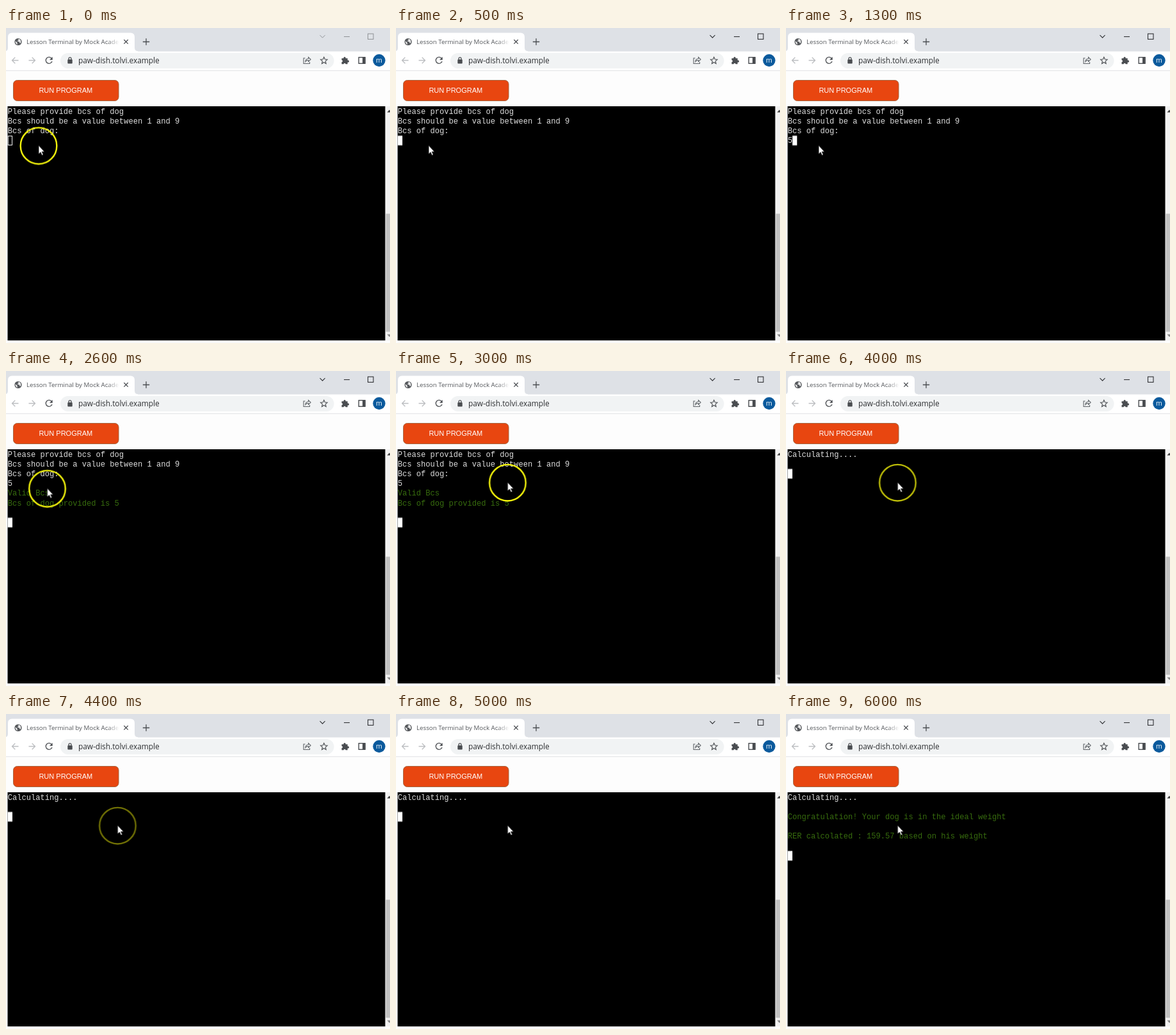
Recreate the animation shown at these times as an HTML page. Size 600 px wide and 491 px high, loop 7000 ms.

```html
<!DOCTYPE html>
<html lang="en">
<head>
<meta charset="utf-8">
<title>Terminal session</title>
<style>
  html, body { margin: 0; width: 100%; height: 100%; overflow: hidden; background: #fdfdfd; }
  svg { display: block; width: 100%; height: 100%; }

  .ui { font-family: "Open Sans", "Noto Sans", sans-serif; }
  .line { fill: none; stroke: #4a4d51; stroke-width: 1.3; }
  .term { font: 12.1px "Liberation Mono", "Courier New", monospace; fill: #dedede; }
  .ok { fill: #376c0e; }

  /* 7 s loop: 100 ms is 1.4286 % */
  .anim { animation: 7s step-end infinite; }
  .blurred { animation-name: blurred; }
  .focused { animation-name: focused; }
  .ask { animation-name: ask; }
  .typed { animation-name: typed; }
  .valid { animation-name: valid; }
  .calc { animation-name: calc; }
  .result { animation-name: result; }
  .caret { animation-name: caret; }
  .mouse { animation-name: mouse; }
  .ring { animation-name: ring; }

  @keyframes blurred { 0% { visibility: visible } 1.428%, 100% { visibility: hidden } }
  @keyframes focused { 0% { visibility: hidden } 1.428%, 100% { visibility: visible } }
  @keyframes ask { 0% { visibility: visible } 51.428%, 100% { visibility: hidden } }
  @keyframes typed { 0% { visibility: hidden } 18.571% { visibility: visible } 51.428%, 100% { visibility: hidden } }
  @keyframes valid { 0% { visibility: hidden } 22.857% { visibility: visible } 51.428%, 100% { visibility: hidden } }
  @keyframes calc { 0% { visibility: hidden } 51.428%, 100% { visibility: visible } }
  @keyframes result { 0% { visibility: hidden } 85.714%, 100% { visibility: visible } }

  @keyframes caret {
    0% { transform: translate(0, 45.6px) }
    18.571% { transform: translate(7.26px, 45.6px) }
    22.857% { transform: translate(0, 106.4px) }
    51.428% { transform: translate(0, 30.4px) }
    85.714%, 100% { transform: translate(0, 91.2px) }
  }
  @keyframes mouse {
    0% { transform: translate(51px, 183.5px) }
    37.142% { transform: translate(64.5px, 183.3px) }
    38.571% { transform: translate(88px, 176px) }
    39.999% { transform: translate(122px, 168px) }
    41.428% { transform: translate(155px, 168px) }
    42.857%, 100% { transform: translate(174.4px, 174px) }
  }
  @keyframes ring {
    0% { opacity: 1 }
    1.428% { opacity: .5 }
    2.857% { opacity: 0 }
    37.142% { opacity: 1 }
    52.857% { opacity: 1; animation-timing-function: steps(13) }
    71.428%, 100% { opacity: 0 }
  }
</style>
</head>
<body>
<svg viewBox="0 0 600 491" preserveAspectRatio="none">
  <defs>
    <linearGradient id="fade">
      <stop offset="0" stop-color="#fff" stop-opacity="0"/>
      <stop offset="1" stop-color="#fff"/>
    </linearGradient>
    <clipPath id="title"><rect x="30" y="10" width="147" height="24"/></clipPath>
    <g id="controls" fill="none">
      <path d="M490.5 11.2l4 4 4-4"/>
      <path d="M528 13.5h9"/>
      <rect x="565.5" y="9" width="8.5" height="8.5"/>
    </g>
  </defs>

  <!-- tab strip -->
  <rect width="600" height="37" fill="#dee1e6"/>
  <path d="M0 37V36Q3 35 3 31V14Q3 7.5 9.500 7.500H194.500Q201 7.500 201 14V31Q201 36 206 36V37Z" fill="#fff"/>
  <circle cx="19" cy="21.500" r="5.600" fill="#55585c"/>
  <path d="M14.800 20.200l2.800 2.700v3q-3.500-2-2.800-5.700zM18.300 17.200h3l1.800 2.300v4.300l-1.900-.8-.4-1.700h-2.600v-1.500l1.800-.9z" fill="#f2f2f2"/>
  <g clip-path="url(#title)">
    <text class="ui" x="32" y="25" font-size="9.750" fill="#53565a">Lesson Terminal by Mock Academy</text>
    <rect x="158" y="12" width="19" height="20" fill="url(#fade)"/>
  </g>
  <path class="line" d="M184.300 18.200l6.400 6.400m0-6.400l-6.400 6.400"/>
  <path class="line" stroke-width="1.500" d="M213.800 21.500h10.400M219 16.300v10.400"/>
  <use class="anim blurred" href="#controls" stroke="#8f9296"/>
  <use class="anim focused" href="#controls" stroke="#303235" stroke-width="1.100"/>

  <!-- toolbar -->
  <rect y="36.500" width="600" height="30" fill="#fff"/>
  <rect y="66" width="600" height="1" fill="#e3e4e6"/>
  <g fill="none" stroke="#bcbec1" stroke-width="1.300">
    <path d="M19.500 50.500H9.500m4.800-4.800l-4.800 4.800 4.800 4.800"/>
    <path d="M35.500 50.500h10m-4.800-4.800l4.800 4.800-4.800 4.800"/>
  </g>
  <path class="line" stroke-width="1.500" d="M71.300 47.300A5 5 0 1 0 72 52"/>
  <path d="M72.700 45v4.700H68z" fill="#4a4d51"/>
  <rect x="85" y="39" width="427.500" height="24" rx="12" fill="#f1f3f4"/>
  <rect x="96.300" y="49" width="7.400" height="6.400" rx="1" fill="#4a4d51"/>
  <path class="line" d="M98 49.500v-1.700a2 2 0 0 1 4 0v1.700"/>
  <text class="ui" x="113" y="54.700" font-size="11.850" fill="#2d2f32">paw-dish.tolvi.example</text>

  <g fill="none" stroke="#5f6368" stroke-width="1.100">
    <path d="M467.500 47h-2.500v8.500h9.500v-2.500"/>
    <path d="M467.800 52.500q.4-4.500 4.700-4.800v-2.200l3.600 3.500-3.600 3.500v-2.200q-3-.1-4.700 2.200z"/>
    <path stroke="#4a4d51" d="M496.800 45.300l1.500 3.500 3.800.4-2.900 2.500.9 3.800-3.300-2-3.300 2 .9-3.800-2.900-2.500 3.800-.4z"/>
  </g>
  <path d="M524.500 47.300h3v-.8a1.600 1.600 0 0 1 3.200 0v.8h3v3h.8a1.600 1.600 0 0 1 0 3.200h-.8v2.700h-3.100a1.500 1.500 0 0 0-3 0h-3.100v-3.100a1.500 1.500 0 0 0 0-3z" fill="#4a4d51"/>
  <rect x="551.200" y="45.700" width="9.800" height="9.600" fill="none" stroke="#4a4d51" stroke-width="1.400"/>
  <rect x="557" y="45.500" width="4.500" height="10" fill="#4a4d51"/>
  <circle cx="583" cy="50.500" r="9.700" fill="#0b5a9d"/>
  <text class="ui" x="583" y="54" font-size="10.500" text-anchor="middle" fill="#fff">m</text>

  <!-- page -->
  <rect x="11.500" y="81.500" width="164.500" height="32" rx="6" fill="#e84610" stroke="#a5643f"/>
  <text x="93.300" y="101" font-family="Liberation Sans, Arial, sans-serif" font-size="11" text-anchor="middle" fill="#fff">RUN PROGRAM</text>
  <rect x="592.500" y="122" width="7.500" height="365" fill="#f1f1f1"/>
  <rect x="593.500" y="289.500" width="6.500" height="184" fill="#c1c1c1"/>
  <path d="M595.500 131.500l3.500-4 3.500 4z" fill="#404040"/>
  <path d="M595.500 477.500l3.500 4 3.500-4z" fill="#8b8b8b"/>
  <rect x="2.500" y="122" width="590" height="365" fill="#000"/>

  <!-- terminal -->
  <g class="term">
    <g class="anim ask">
      <text x="2.700" y="133.600">Please provide bcs of dog</text>
      <text x="2.700" y="148.800">Bcs should be a value between 1 and 9</text>
      <text x="2.700" y="164">Bcs of dog:</text>
    </g>
    <text class="anim typed" x="2.700" y="179.200">5</text>
    <g class="anim valid ok">
      <text x="2.700" y="194.400">Valid Bcs</text>
      <text x="2.700" y="209.600">Bcs of dog provided is 5</text>
    </g>
    <text class="anim calc" x="2.700" y="133.600">Calculating....</text>
    <g class="anim result ok">
      <text x="2.700" y="164">Congratulation! Your dog is in the ideal weight</text>
      <text x="2.700" y="194.400">RER calcolated : 159.57 based on his weight</text>
    </g>
  </g>
  <rect class="anim blurred" x="3.300" y="168.300" width="6.200" height="14.200" fill="none" stroke="#f4f4f4"/>
  <g class="anim focused">
    <rect class="anim caret" x="2.700" y="122.300" width="7.300" height="15" fill="#fff"/>
  </g>

  <!-- pointer -->
  <g class="anim mouse">
    <circle class="anim ring" cy=".2" r="28.300" fill="none" stroke="#f6f60c" stroke-width="2.400"/>
    <path d="M0-.5V13L3.100 10.200 5.200 15 7.300 14.100 5.200 9.400H9.200Z" fill="#fff" stroke="#000" stroke-width=".7"/>
  </g>
</svg>
</body>
</html>
```
